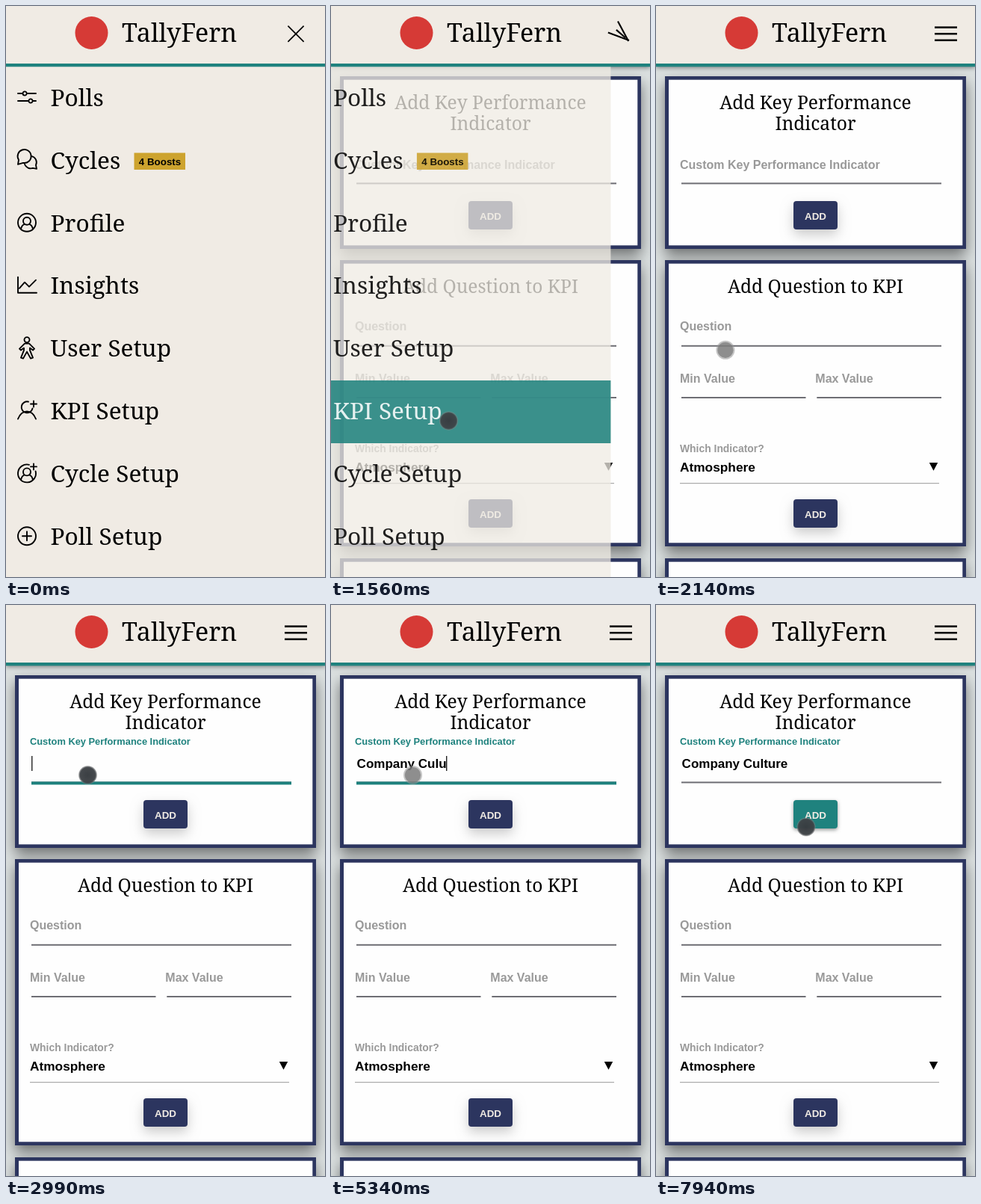
Animation of 427x764 px, one loop 7.99 s. Source, as an HTML page with a canvas:

```html
<!DOCTYPE html>
<html lang="en">
<head>
<meta charset="utf-8">
<title>KPI setup</title>
<style>
html, body { margin: 0; width: 100%; height: 100%; overflow: hidden; background: #f0ebe4; }
canvas { display: block; width: 427px; height: 764px; }
</style>
</head>
<body>
<canvas id="stage"></canvas>
<script>
const W = 427, H = 764, LOOP = 7990;
const canvas = document.getElementById('stage');
const g = canvas.getContext('2d');
const dpr = window.devicePixelRatio || 1;
canvas.width = W * dpr;
canvas.height = H * dpr;

const CREAM = '#f0ebe4', TEAL = [31, 130, 126], NAVY = [44, 53, 95], GRAY = [153, 153, 153], LINE = [110, 110, 116];
const SLIDE = 1435, FOCUS = 2700, BLUR = 7650;

const clamp = v => Math.max(0, Math.min(1, v));
const lerp = (a, b, p) => a + (b - a) * p;
const phase = (t, start, length) => clamp((t - start) / length);
const mix = (a, b, p) => `rgb(${a.map((v, i) => Math.round(lerp(v, b[i], p)))})`;
const rgb = c => `rgb(${c})`;

// CSS-like cubic bezier timing
function bezier(x1, y1, x2, y2) {
  const f = (a, b, s) => 3 * a * s * (1 - s) ** 2 + 3 * b * s * s * (1 - s) + s ** 3;
  return x => {
    let lo = 0, hi = 1;
    for (let i = 0; i < 24; i++) {
      const m = (lo + hi) / 2;
      if (f(x1, x2, m) < x) lo = m; else hi = m;
    }
    return f(y1, y2, (lo + hi) / 2);
  };
}
const ease = bezier(.25, .1, .25, 1);
const easeInOut = bezier(.42, 0, .58, 1);

function track(keys, t) {
  let i = 0;
  while (i < keys.length - 2 && t >= keys[i + 1][0]) i++;
  const a = keys[i], b = keys[i + 1], p = phase(t, a[0], b[0] - a[0]);
  return a.slice(1).map((v, k) => lerp(v, b[k + 1], p));
}

const pointer = [
  [230, 336, 629], [500, 300, 535], [700, 240, 506], [1020, 165, 524], [1050, 162, 530],
  [1200, 161, 541], [1300, 157.5, 555], [1750, 157.5, 555], [2000, 115, 500], [2140, 93, 461],
  [2190, 90, 427], [2280, 87, 300], [2370, 102, 166], [2540, 102, 166], [2690, 109.5, 227.5],
  [6790, 109.5, 227.5], [6820, 118, 227.5], [7100, 150, 240], [7450, 199, 289], [7600, 201, 297]
];
const pressure = [[1150, 0], [1300, 1], [1700, 1], [1850, 0], [2640, 0], [2740, 1], [3050, 1], [3220, 0], [7600, 0], [7700, 1]];
const typing = [
  [FOCUS, ''], [3400, 'C'], [3810, 'Co'], [3960, 'Com'], [4140, 'Comp'], [4280, 'Compa'], [4430, 'Compan'],
  [4550, 'Company'], [4880, 'Company '], [4950, 'Company C'], [5010, 'Company Cu'], [5160, 'Company Cul'],
  [5340, 'Company Culu'], [5710, 'Company Cul'], [5890, 'Company Cult'], [6070, 'Company Cultu'],
  [6220, 'Company Cultur'], [6250, 'Company Culture']
];

const serif = size => `500 ${size}px "Noto Serif", serif`;
const sans = size => `bold ${size}px "Liberation Sans", Arial, sans-serif`;

function text(str, x, y, font, color, align = 'left') {
  g.font = font;
  g.fillStyle = color;
  g.textAlign = align;
  g.fillText(str, x, y);
}

function box(x, y, w, h, color) {
  g.fillStyle = color;
  g.fillRect(x, y, w, h);
}

function shadow(dy, blur, alpha) {
  g.shadowColor = `rgba(0,0,0,${alpha})`;
  g.shadowOffsetY = dy * dpr;
  g.shadowBlur = blur * dpr;
}

function disc(x, y, r, color) {
  g.fillStyle = color;
  g.beginPath();
  g.arc(x, y, r, 0, 7);
  g.fill();
}

function card(y, h) {
  g.save();
  shadow(9, 18, .5);
  box(12, y, 403, h, rgb(NAVY));
  g.restore();
  box(17, y + 4.7, 393.3, h - 9.4, '#fefefe');
}

function button(y, active) {
  g.save();
  shadow(lerp(7, 2, active), lerp(16, 5, active), lerp(.2, .4, active));
  g.fillStyle = mix(NAVY, TEAL, active);
  g.beginPath();
  g.roundRect(184, y, 59, 38, 4);
  g.fill();
  g.restore();
  text('ADD', 213.5, y + 24.8, sans(13.4), '#f0ebe4', 'center');
}

function field(label, x, y, w) {
  text(label, x, y - 20.5, sans(16), rgb(GRAY));
  box(x + 2, y - 1, w, 2, rgb(LINE));
}

function customField(t) {
  const up = ease(phase(t, FOCUS, 200));
  const on = ease(phase(t, FOCUS, 200)), off = phase(t, BLUR, 200);
  text('Custom Key Performance Indicator', 32, lerp(218, 187, up), sans(lerp(16, 12.85, up)), mix(GRAY, TEAL, up));
  box(34, 236.4, 348, 2, rgb(LINE));
  if (on > 0 && off < 1) {
    const half = 174 * on;
    g.globalAlpha = 1 - off;
    box(208 - half, 236.4, half * 2, 4, rgb(TEAL));
    g.globalAlpha = 1;
  }
  const last = typing.filter(k => t >= k[0]).pop();
  if (!last) return;
  text(last[1], 34.6, 217.8, sans(17), '#000');
  const lit = Math.floor((t - last[0]) / 530) % 2 === 0;
  if (lit && t < BLUR) box(34.8 + g.measureText(last[1]).width - .6, 202, 1.2, 20, '#000');
}

function page(t) {
  box(0, 0, W, H, '#dce1e1');
  card(94, 231);
  card(340, 383);
  card(739, 200);

  text('Add Key Performance', 213.5, 137.5, serif(24.6), '#000', 'center');
  text('Indicator', 213.5, 165.5, serif(24.6), '#000', 'center');
  customField(t);
  button(261, ease(phase(t, BLUR, 200)));

  text('Add Question to KPI', 213.5, 383.5, serif(24.6), '#000', 'center');
  field('Question', 32, 454.8, 348);
  field('Min Value', 32, 524, 166.5);
  field('Max Value', 213.3, 524, 166.7);
  text('Which Indicator?', 32, 597, sans(13.9), rgb(GRAY));
  text('Atmosphere', 32, 623, sans(17.3), '#000');
  g.fill(new Path2D('M365.8 611h11.4l-5.7 10.8z'));
  box(32, 638, 347, 1.2, '#aaa');
  button(660, 0);
}

// Icons are drawn around (0, 0)
const PLUS = 'M9 -13v8M5 -9h8';
const BUST = 'M5 -2a5 5 0 1 1 -10 0a5 5 0 1 1 10 0M-8 9q1 -6 5 -7M8 9q-1 -6 -5 -7';
const items = [
  ['Polls', 'M-12 -5h6.5M0 -5h12M-.3 -5a2.6 2.6 0 1 1 -5.2 0a2.6 2.6 0 1 1 5.2 0M-12 5h14M8 5h4M7.6 5a2.6 2.6 0 1 1 -5.2 0a2.6 2.6 0 1 1 5.2 0'],
  ['Cycles', 'M-12 6l1 -6a9 9 0 1 1 6 4zM6 -5a8.500 8.500 0 0 1 6 12l1 5l-5 -1a9 9 0 0 1 -11 -5'],
  ['Profile', 'M12 0a12 12 0 1 1 -24 0a12 12 0 1 1 24 0' + BUST],
  ['Insights', 'M-12 -11v21h25M-10 4l7 -8l6 6l9 -9'],
  ['User Setup', 'M3.500 -11a3.500 3.500 0 1 1 -7 0a3.500 3.500 0 1 1 7 0M-3 -6h6l7 7l-2 2l-4 -3v3l4 10l-3 1l-5 -9l-5 9l-3 -1l4 -10v-3l-4 3l-2 -2z'],
  ['KPI Setup', 'M2 -12a7.500 7.500 0 1 0 5.500 9M-12 11q4 -10 12 -10q8 0 12 10' + PLUS],
  ['Cycle Setup', 'M3 -11.600a12 12 0 1 0 8.600 8.600' + BUST + PLUS],
  ['Poll Setup', 'M12 0a12 12 0 1 1 -24 0a12 12 0 1 1 24 0M-6 0h12M0 -6v12']
].map(([label, d]) => ({ label, path: new Path2D(d) }));

function menu(t) {
  const e = easeInOut(phase(t, SLIDE, 500));
  if (e >= 1) return;
  g.save();
  g.translate(-431 * e, 0);
  g.globalAlpha = (1 - e) ** 2;
  box(0, 81, 431, H, CREAM);
  g.globalAlpha = 1 - e;
  g.lineWidth = 1.9;
  g.lineCap = g.lineJoin = 'round';
  items.forEach(({ label, path }, i) => {
    const picked = i === 5 && t >= SLIDE;
    const color = picked ? '#fff' : '#000';
    const y = 122 + 83.9 * i;
    if (picked) box(0, 501, 431, 84, rgb(TEAL));
    text(label, 59.5, y + 11.7, serif(31.6), color);
    g.save();
    g.translate(28, y);
    g.strokeStyle = color;
    g.stroke(path);
    g.restore();
  });
  box(171.500, 196.5, 68.5, 22.5, '#cda32e');
  text('4 Boosts', 206, 213, sans(13.33), '#000', 'center');
  g.restore();
}

function burger(t) {
  const p = ease(phase(t, SLIDE, 400));
  g.save();
  g.translate(388, 37.2);
  g.rotate((1 - p) * Math.PI / 2);
  for (const side of [-1, 0, 1]) {
    const len = side ? 30 : 30 * p, thick = lerp(1.7, 2.5, p);
    g.save();
    g.translate(0, side * 8.6 * p);
    g.rotate(-side * (1 - p) * Math.PI / 4);
    box(-len / 2, -thick / 2, len, thick, '#000');
    g.restore();
  }
  g.restore();
}

function header(t) {
  box(0, 0, W, 77, CREAM);
  box(0, 77, W, 4.3, rgb(TEAL));
  disc(114.5, 36, 22, '#d63a36');
  text('TallyFern', 155, 48, serif(34), '#000');
  burger(t);
}

function touch(t) {
  if (t < 230) return;
  const [x, y] = track(pointer, t), [press] = track(pressure, t);
  disc(x, y, 12.5, 'rgba(150,150,150,.55)');
  disc(x, y, 10.6, 'rgba(118,118,118,.7)');
  if (press <= 0) return;
  const shade = g.createRadialGradient(x, y, 0, x, y, 12);
  shade.addColorStop(0, `rgba(45,50,55,${.85 * Math.min(1, press * 1.6)})`);
  shade.addColorStop(.85, `rgba(45,50,55,${.75 * press * press})`);
  shade.addColorStop(1, `rgba(45,50,55,${.3 * press})`);
  disc(x, y, 12, shade);
}

function draw(t) {
  g.setTransform(dpr, 0, 0, dpr, 0, 0);
  page(t);
  g.save();
  shadow(2, 6, .4);
  box(0, 0, W, 81, rgb(TEAL));
  g.restore();
  menu(t);
  header(t);
  touch(t);
}

const start = performance.now();
function frame() {
  draw((performance.now() - start) % LOOP);
  requestAnimationFrame(frame);
}
frame();
</script>
</body>
</html>
```
